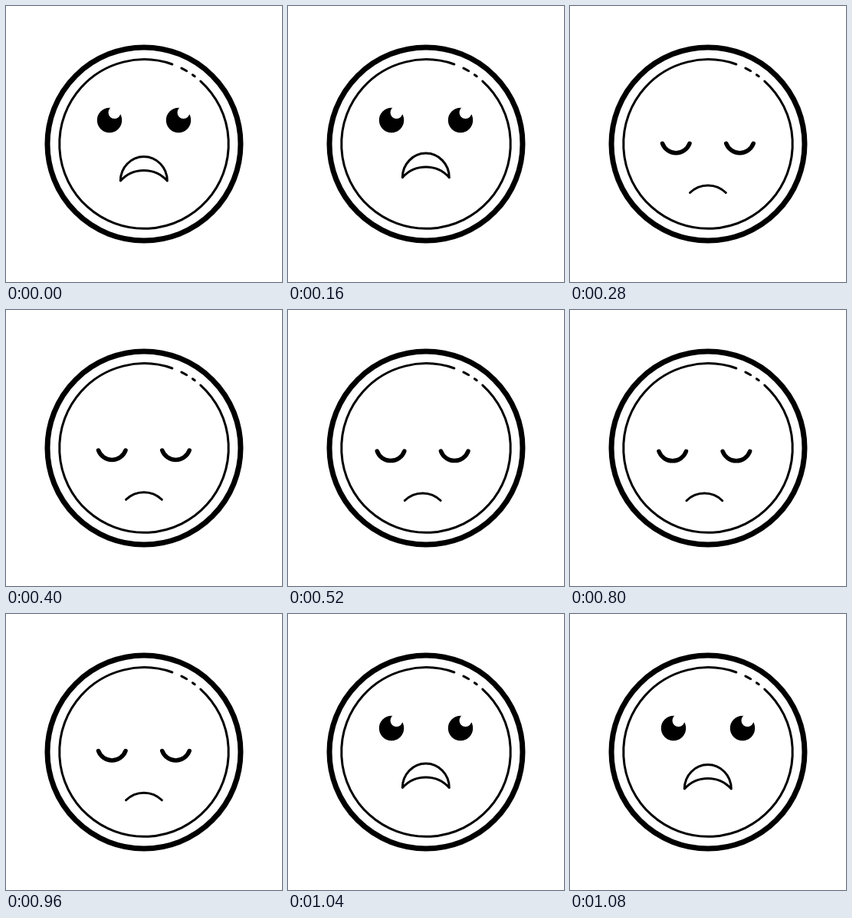
Animation of 360x360 px, one loop 1.12 s. Source, as an HTML page:

```html
<!DOCTYPE html>
<html lang="en">
<head>
<meta charset="utf-8">
<title>Sad face</title>
<style>
  html, body { margin: 0; width: 100%; height: 100%; overflow: hidden; background: #fff; }
  svg { display: block; width: 100vw; height: 100vh; }
</style>
</head>
<body>
<svg viewBox="0 0 360 360" fill="none" stroke="#000" stroke-width="3" stroke-linecap="round" stroke-linejoin="round">
  <defs>
    <g id="eye" stroke="none">
      <circle cx="135" cy="149" r="16.2" fill="#000"/>
      <circle cx="141.5" cy="139" r="8" fill="#fff"/>
    </g>
    <path id="lid" d="M120.5 183A18.9 18.9 0 0 0 156 183" stroke-width="5.5"/>
  </defs>
  <circle cx="180" cy="180" r="126" stroke-width="7"/>
  <circle cx="180" cy="180" r="110.3" pathLength="360" stroke-dasharray="337.5 6.8 4 4.7 1.8 5.2" transform="rotate(-48 180 180)"/>
  <g id="awake">
    <use href="#eye"/>
    <use href="#eye" x="90"/>
    <path id="mouth" d="M149.3 228A30.5 31.6 0 0 1 210.3 228A41 41 0 0 0 149.3 228Z"/>
  </g>
  <g id="asleep">
    <use href="#lid"/>
    <use href="#lid" x="83.2"/>
    <path d="M156.5 247.3A33.3 33.3 0 0 1 203.3 247.3"/>
  </g>
</svg>
<script>
const LOOP = 1120, STEP = 40, CLOSE = 240, OPEN = 1000;
const lift = [[0, 0], [160, -4.3], [240, -5], [400, 0], [640, 2.4], [800, 1.4], [960, -4.5], [1080, 0], [1120, 0]];
const el = id => document.getElementById(id);
const awake = el('awake'), mouth = el('mouth'), asleep = el('asleep');

function at(keys, t) {
  const i = keys.findIndex(k => k[0] > t);
  const [t0, v0] = keys[i - 1], [t1, v1] = keys[i];
  return v0 + (v1 - v0) * (t - t0) / (t1 - t0);
}

// The closed face shakes from side to side, fading slightly
function shake(t) {
  if (t < 400 || t > 880) return 0;
  const size = 6 - Math.max(0, t - 640) / 110;
  return -size * Math.sin((t - 400) / 320 * 2 * Math.PI);
}

function draw() {
  const t = Math.floor(performance.now() % LOOP / STEP) * STEP;
  const closed = t >= CLOSE && t < OPEN;
  const y = at(lift, t);
  awake.style.display = closed ? 'none' : '';
  asleep.style.display = closed ? '' : 'none';
  mouth.setAttribute('transform', `translate(0 ${y})`);
  asleep.setAttribute('transform', `translate(${shake(t)} ${y})`);
  requestAnimationFrame(draw);
}
draw();
</script>
</body>
</html>
```
